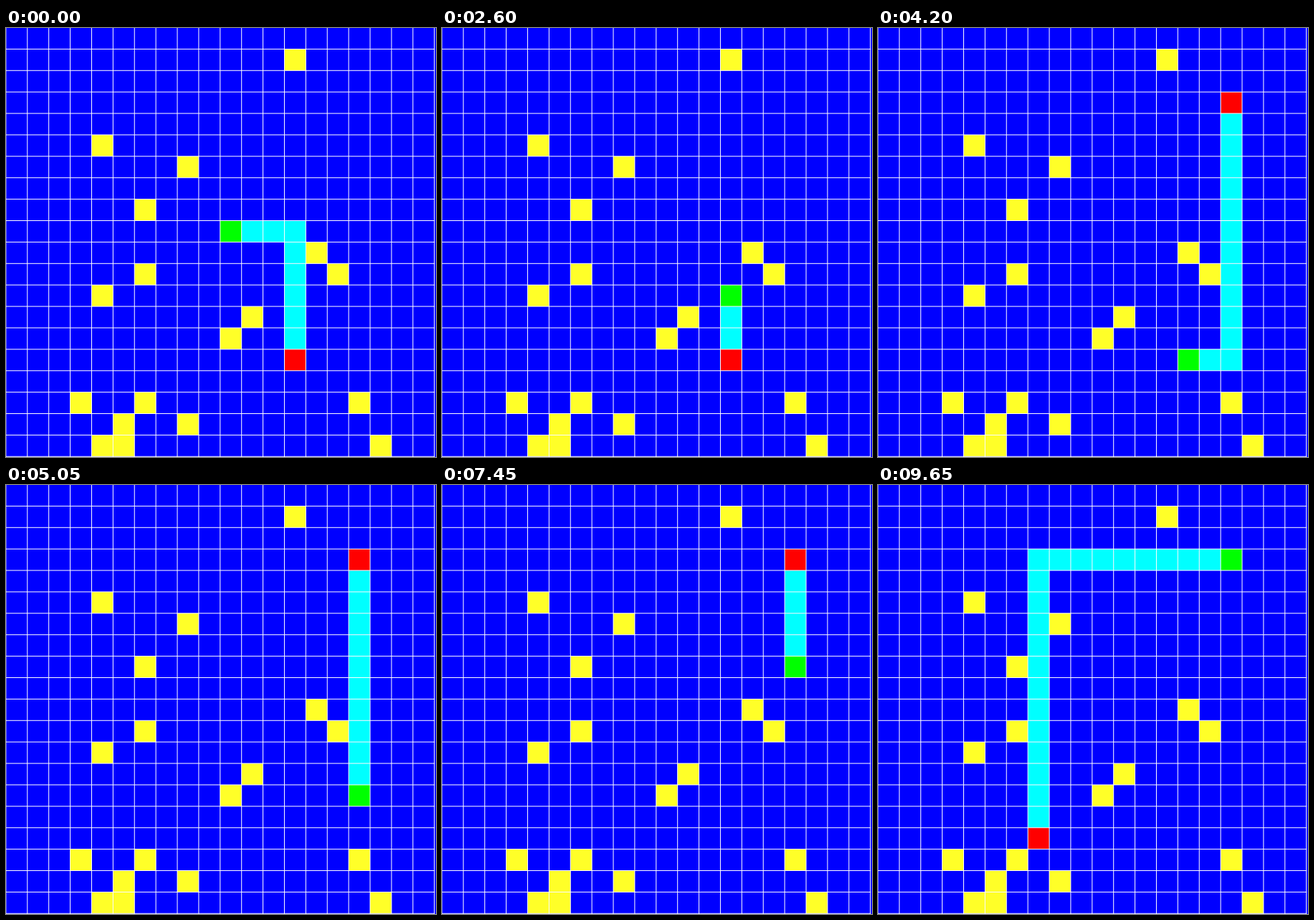
An HTML page with a canvas that plays this animation: 600x598 px, repeating every 9.7 s.

```html
<!DOCTYPE html>
<html lang="en">
<head>
<meta charset="utf-8">
<title>Grid path</title>
<style>
html, body { margin: 0; width: 100%; height: 100%; overflow: hidden; background: #00f; }
canvas { display: block; }
</style>
</head>
<body>
<canvas id="stage" width="600" height="598"></canvas>
<script>
const canvas = document.getElementById('stage');
const ctx = canvas.getContext('2d');
const { width, height } = canvas;
const LOOP = 9700, STEP = 400, LEAD = 150;
const CELLS = 20, PITCH = 29.89;

// Rows of the walls, by column.
const walls = {
  3: [17], 4: [5, 12, 19], 5: [18, 19], 6: [8, 11, 17], 8: [6, 18],
  10: [14], 11: [13], 13: [1], 14: [10], 15: [11], 16: [17], 17: [19]
};

// The agent visits these in turn, first along the row, then along the column.
const stops = [[10, 9], [13, 15], [16, 3], [7, 16]];
const routes = stops.slice(1).map((goal, i) => route(stops[i], goal));

function route([x, y], [goalX, goalY]) {
  const cells = [[x, y]];
  while (x !== goalX || y !== goalY) {
    if (x !== goalX) x += Math.sign(goalX - x);
    else y += Math.sign(goalY - y);
    cells.push([x, y]);
  }
  return cells;
}

// Lines fall between pixels, so their edges are left to antialiasing.
const lineX = k => PITCH * k - 0.6;
const lineY = k => PITCH * k - 1;

function fillCell([col, row], color) {
  ctx.fillStyle = color;
  ctx.fillRect(lineX(col) + 0.5, lineY(row) + 0.5, PITCH, PITCH);
}

function drawGrid() {
  ctx.fillStyle = '#fff';
  for (let k = 0; k <= CELLS; k++) {
    ctx.fillRect(lineX(k), 0, 1, height);
    ctx.fillRect(0, lineY(k), lineX(CELLS) + 1, 1);
  }
}

function draw(time) {
  let step = Math.floor((time + LEAD) / STEP);
  let leg = 0;
  while (leg < routes.length - 1 && step >= routes[leg].length - 1) {
    step -= routes[leg].length - 1;
    leg++;
  }
  const ahead = routes[leg].slice(step);

  ctx.fillStyle = '#00f';
  ctx.fillRect(0, 0, width, height);
  for (const col in walls) {
    for (const row of walls[col]) fillCell([+col, row], '#ffff28');
  }
  for (const cell of ahead) fillCell(cell, '#0ff');
  fillCell(ahead[ahead.length - 1], '#f00');
  fillCell(ahead[0], '#0f0');
  drawGrid();
}

const start = performance.now();
function tick() {
  draw((performance.now() - start) % LOOP);
  requestAnimationFrame(tick);
}
tick();
</script>
</body>
</html>
```
